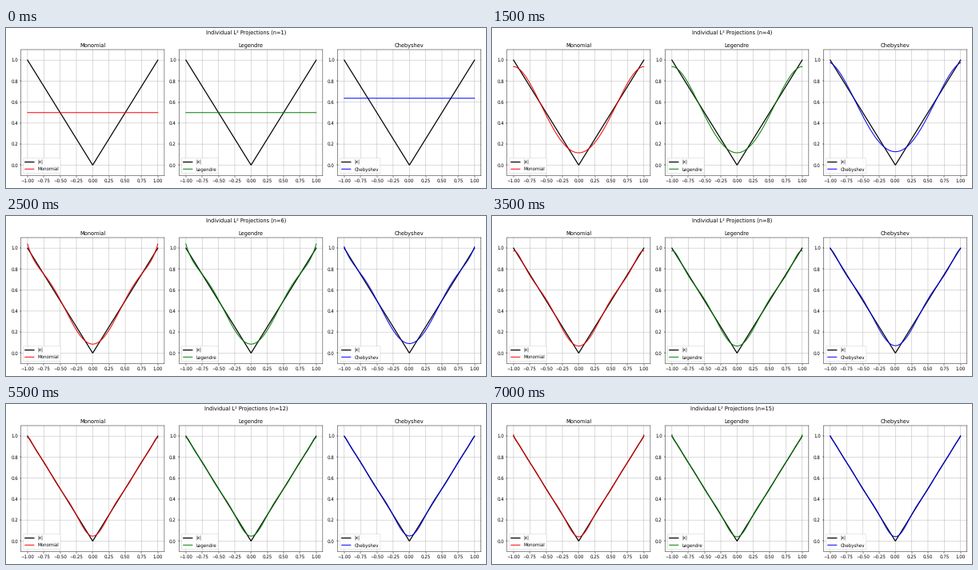
These frames come from a looping animation (600x200 px, 7.5 s). A matplotlib script:

```python
import matplotlib.pyplot as plt
import numpy as np
from matplotlib.animation import FuncAnimation
from numpy.polynomial import chebyshev, legendre

STEPS = 15
W, H, DPI = 600, 200, 40
x = np.linspace(-1, 1, 500)

# Smooth sub-pixel placement suits the small size.
plt.rcParams.update({"text.hinting": "none", "path.snap": False})


def legendre_fit(n):
    """Least-squares projection of |x| with unit weight."""
    t, w = legendre.leggauss(400)
    coef = [(2 * k + 1) / 2 * np.sum(w * abs(t) * legendre.Legendre.basis(k)(t))
            for k in range(n + 1)]
    return legendre.legval(x, coef)


def chebyshev_fit(n):
    """Projection of |x| with weight 1 / sqrt(1 - x^2)."""
    coef = np.zeros(n + 1)
    coef[0] = 2 / np.pi
    for k in range(1, n // 2 + 1):
        coef[2 * k] = 4 / np.pi * (-1) ** (k + 1) / (4 * k * k - 1)
    return chebyshev.chebval(x, coef)


# The monomial and Legendre bases span the same space.
bases = [("Monomial", "red", legendre_fit),
         ("Legendre", "green", legendre_fit),
         ("Chebyshev", "blue", chebyshev_fit)]

fig, axes = plt.subplots(1, 3, figsize=(W / DPI, H / DPI), dpi=DPI)
fig.subplots_adjust(left=18.8 / W, right=593.8 / W, bottom=15.5 / H,
                    top=173 / H, wspace=0.105)
title = fig.suptitle("Individual L² Projections (n=1)", y=0.987)
curves = []
for ax, (name, color, fit) in zip(axes, bases):
    ax.plot(x, abs(x), color="black", lw=2.2, label="|x|")
    line, = ax.plot(x, fit(1), color=color, lw=1.8, label=name)
    curves.append((line, fit))
    ax.set_title(name)
    ax.set_ylim(-0.1, 1.1)
    ax.grid(True)
    ax.legend(loc="lower left")


def update(i):
    n = i + 1
    title.set_text(f"Individual L² Projections (n={n})")
    for line, fit in curves:
        line.set_ydata(fit(n))
    return [title] + [line for line, _ in curves]


anim = FuncAnimation(fig, update, frames=STEPS, interval=500,
                     repeat=True, repeat_delay=0)
plt.show()
```
